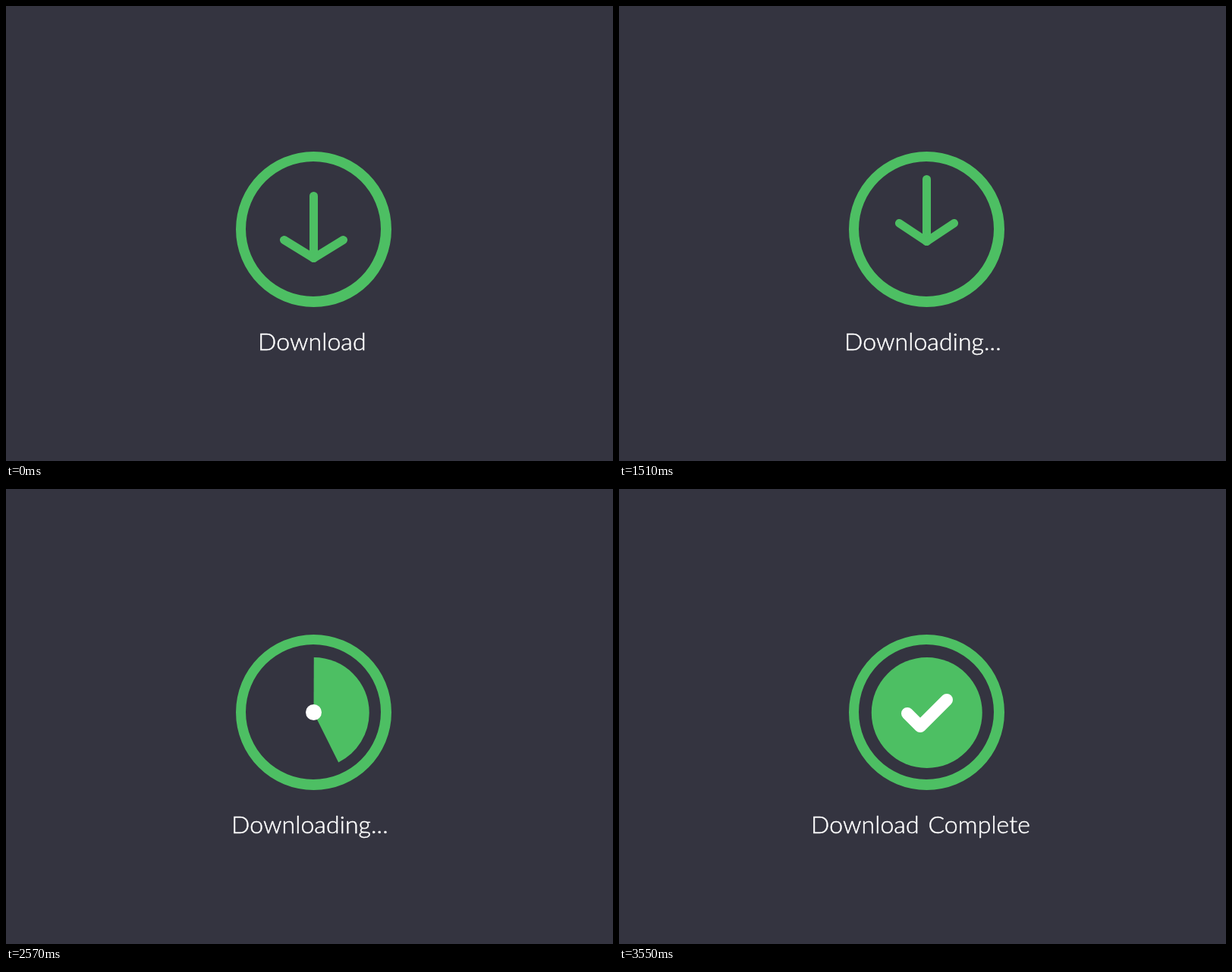
An HTML page with a canvas for the animation above (5.55 s loop, 800 by 600 pixels).

```html
<!DOCTYPE html>
<html lang="en">
<head>
<meta charset="utf-8">
<title>Download button</title>
<style>
  html, body { margin: 0; width: 100%; height: 100%; overflow: hidden; background: #343440; }
  canvas { display: block; }
</style>
</head>
<body>
<canvas id="stage" width="800" height="600"></canvas>
<script>
const ctx = document.getElementById('stage').getContext('2d');
const LOOP = 5550;
const GREEN = '#4dbf63', PRESSED = '#469859', WHITE = '#fff';
const CX = 405.5, CY = 294.5;
// Text and the left edge of its ink.
const LABELS = {
  idle: ['Download', 335],
  busy: ['Downloading...', 300],
  done: ['Download Complete', 256]
};

const clamp = v => Math.max(0, Math.min(1, v));
const mix = (a, b, k) => a + (b - a) * k;

// Motion steps: 30 ms each, 50 ms while the pie fills, then 30 ms again.
function stepAt(t) {
  if (t < 1300) return -1;
  if (t < 2170) return Math.floor((t - 1300) / 30);
  if (t < 3220) return 29 + Math.floor((t - 2170) / 50);
  return Math.min(61, 50 + Math.floor((t - 3220) / 30));
}

function line(points, width, color) {
  ctx.beginPath();
  points.forEach(([x, y]) => ctx.lineTo(x, y));
  ctx.lineWidth = width;
  ctx.lineCap = ctx.lineJoin = 'round';
  ctx.strokeStyle = color;
  ctx.stroke();
}

function disc(x, y, r, color) {
  ctx.beginPath();
  ctx.arc(x, y, r, 0, Math.PI * 2);
  ctx.fillStyle = color;
  ctx.fill();
}

// The hole sits half a pixel up and left of the rim.
function ring(color) {
  ctx.beginPath();
  ctx.arc(CX, CY, 102.5, 0, Math.PI * 2);
  ctx.closePath();
  ctx.moveTo(CX + 88.5, CY - 0.5);
  ctx.arc(CX - 0.5, CY - 0.5, 89, 0, Math.PI * 2);
  ctx.fillStyle = color;
  ctx.fill('evenodd');
}

function arrow(n, color) {
  const lift = 22 * clamp((n + 1) / 7);
  const spread = Math.max(0, 39 - 2.9 * Math.max(0, n - 6));
  const tip = 332.5 - lift - 12 * clamp((n - 19) / 4);
  line([[CX, 250.5 - lift], [CX, tip]], 11, color);
  if (spread > 0) {
    line([[CX - spread, tip - 24], [CX, tip], [CX + spread, tip - 24]], 11, color);
  }
}

function pie(n) {
  const sweep = Math.min(360, 81.6 + 14.4 * (n - 32)) * Math.PI / 180;
  ctx.beginPath();
  if (sweep < Math.PI * 2) ctx.moveTo(CX, CY + 0.5);
  ctx.arc(CX + 0.25, CY + 0.5, 73, -Math.PI / 2, sweep - Math.PI / 2);
  ctx.fillStyle = GREEN;
  ctx.fill();
}

function dot(n) {
  const grow = clamp((n - 23) / 3), slide = clamp((n - 50) / 3);
  disc(mix(CX, 380, slide), mix(CY, 296, slide), mix(10.5 * grow, 8, slide), WHITE);
}

function check(n) {
  const run = 52 - 6.5 * (61 - n);
  const a = Math.min(run, 17), b = Math.max(0, run - 17);
  const points = [[380, 296], [380 + a, 296 + a]];
  if (b > 0) points.push([397 + b, 313 - b]);
  line(points, 16, WHITE);
}

function label([text, left]) {
  ctx.font = '300 32px Lato, "Open Sans", sans-serif';
  ctx.letterSpacing = '0.1px';
  ctx.wordSpacing = '3px';
  ctx.textBaseline = 'alphabetic';
  const x = left + ctx.measureText(text).actualBoundingBoxLeft;
  ctx.fillStyle = ctx.strokeStyle = WHITE;
  ctx.lineWidth = 0.5;
  ctx.fillText(text, x, 454);
  ctx.strokeText(text, x, 454);
}

function draw(t) {
  const n = stepAt(t);
  const color = t >= 1000 && t < 1200 ? PRESSED : GREEN;
  ctx.fillStyle = '#343440';
  ctx.fillRect(0, 0, 800, 600);
  ring(color);
  if (n < 27) arrow(n, color);
  else pie(n);
  if (n > 53) check(n);
  else if (n > 23) dot(n);
  label(n < 0 ? LABELS.idle : n < 52 ? LABELS.busy : LABELS.done);
}

const start = performance.now();
function tick() {
  draw((performance.now() - start) % LOOP);
  requestAnimationFrame(tick);
}
tick();
</script>
</body>
</html>
```
